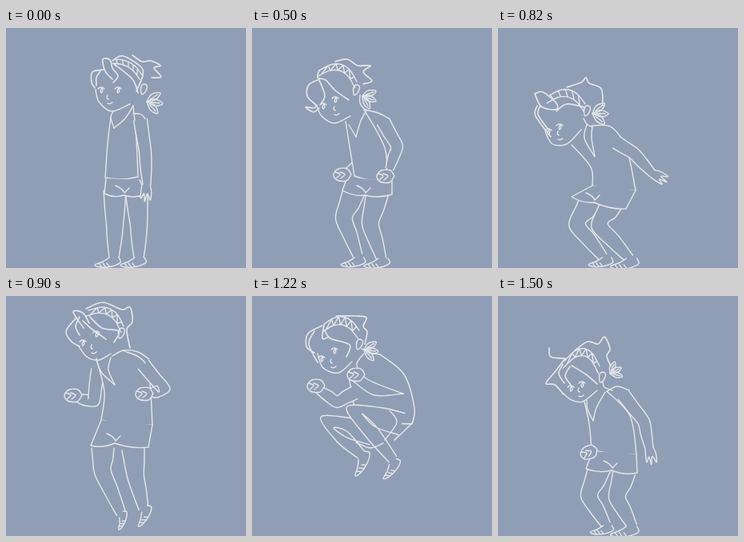
An HTML page that plays this animation: 300x300 px, repeating every 1700 ms.

```html
<!DOCTYPE html>
<html lang="en">
<head>
<meta charset="utf-8">
<title>Jump sketch</title>
<style>
html, body { margin: 0; width: 100%; height: 100%; overflow: hidden; background: #909eb5; }
svg { display: block; width: 100vw; height: 100vh; }
path { fill: none; stroke: #e4e7e9; stroke-width: 1.4; stroke-linecap: round; stroke-linejoin: round; }
.skin { fill: #909eb5; stroke: none; }
.heavy { stroke-width: 1.65; }
</style>
</head>
<body>
<svg id="stage" viewBox="0 0 300 300"></svg>
<script>
let ink = "";
const draw = (d, cls = "") => { ink += `<path class="${cls}" d="${d}"/>`; };
const mix = (a, b, t) => a.map((v, k) => v + (b[k] - v) * t);
const pairs = n => Array.from({ length: n.length / 2 }, (_, i) => [n[2 * i], n[2 * i + 1]]);

// Catmull-Rom spline written as cubic Béziers.
function curve(pts) {
  const at = i => pts[Math.max(0, Math.min(pts.length - 1, i))];
  let d = "M" + pts[0];
  for (let i = 0; i < pts.length - 1; i++) {
    const [a, b, c, e] = [at(i - 1), at(i), at(i + 1), at(i + 2)];
    const c1 = b.map((v, k) => v + (c[k] - a[k]) / 6);
    const c2 = c.map((v, k) => v - (e[k] - b[k]) / 6);
    d += `C${c1} ${c2} ${c}`;
  }
  return d;
}

const line = (...n) => draw(curve(pairs(n)));
const hair = (...n) => draw(curve(pairs(n)), "heavy");
const between = (a, b) => curve(a) + "L" + curve([...b].reverse()).slice(1) + "Z";

// Places a small shape at x, y with a turn and a scale.
function place(x, y, deg, scale, n) {
  const c = Math.cos(deg * Math.PI / 180) * scale, s = Math.sin(deg * Math.PI / 180) * scale;
  return pairs(n).map(([u, v]) => [x + u * c - v * s, y + u * s + v * c]);
}
function solid(pts) {
  draw(curve(pts), "skin");
  draw(curve(pts));
}

// A limb is two contours around a bent centre line.
function limb(start, bend, end, widths) {
  const mid = [start, mix(start, bend, .5), bend, mix(bend, end, .45), end];
  const side = sign => mid.map(([x, y], i) => {
    const [ax, ay] = mid[Math.max(0, i - 1)], [bx, by] = mid[Math.min(4, i + 1)];
    const r = sign * widths[i] / 2 / Math.hypot(bx - ax, by - ay);
    return [x - (by - ay) * r, y + (bx - ax) * r];
  });
  const a = side(1), b = side(-1);
  draw(between(a, b), "skin");
  draw(curve(a) + curve(b));
}
const leg = (...n) => limb(...pairs(n), [28, 25, 21, 18, 12]);
const arm = (...n) => limb(...pairs(n), [17, 16, 15, 14, 10]);

function foot(x, y, deg = 0, scale = 1) {
  solid(place(x, y, deg, scale, [-6, 0, -14, 5, -24, 9, -17, 12, -3, 11, 8, 6, 6, 0]));
  for (const u of [-19, -14, -9]) draw(curve(place(x, y, deg, scale, [u, 7, u + 3, 11])));
}
function fist(x, y, deg = 0) {
  solid(place(x, y, deg, 1, [11, -1, 6, -8, -5, -8, -11, -1, -7, 6, 5, 7, 11, -1]));
  for (const u of [-9, -3]) draw(curve(place(x, y, deg, 1, [u, -4, u + 6, -1, u + 1, 4])));
}
const palm = (x, y, deg) =>
  solid(place(x, y, deg, 1, [0, -5, 8, -7, 19, -6, 11, -2, 21, 1, 11, 2, 17, 6, 8, 6, 0, 5]));

function body(front, back) {
  const a = pairs(front), b = pairs(back);
  draw(between(a, b), "skin");
  const [x, y] = a.at(-1), [u, v] = b.at(-1);
  draw(curve(a) + curve(b) + `M${x} ${y}Q${(x + u) / 2} ${(y + v) / 2 + 5} ${u} ${v}`);
}
function shorts(...n) {
  const [a, b, c, d, e] = pairs(n);
  const sag = (p, q) => `Q${(p[0] + q[0]) / 2} ${(p[1] + q[1]) / 2 + 5} ${q}`;
  const outline = `M${a}L${b}${sag(b, c)}${sag(c, d)}L${e}`;
  draw(outline + "Z", "skin");
  draw(outline + `M${c[0] - 10} ${c[1] - 12}q8 3 11 9l6 -6`);
}

// Headband: two arcs joined by one zigzag or by slanted stripes.
function band(x, y, u, v, rise, depth, zigzag = true) {
  const len = Math.hypot(u - x, v - y), nx = (v - y) / len, ny = (x - u) / len;
  const edge = (shift, t) => {
    const h = 4 * t * (1 - t) * rise - shift;
    return [x + (u - x) * t + nx * h, y + (v - y) * t + ny * h];
  };
  const arc = shift => curve([0, .25, .5, .75, 1].map(t => edge(shift, t)));
  let d = arc(0) + arc(depth);
  for (let i = 1; i < 11; i++) {
    const t = i / 11;
    if (zigzag) d += (i > 1 ? "L" : "M") + edge(i % 2 * depth, t);
    else if (i % 2) d += `M${edge(0, t - .05)}L${edge(depth, t + .05)}`;
  }
  draw(d);
}
function ponytail(x, y, size, deg) {
  for (const turn of [-40, 0, 40]) {
    draw(curve(place(x, y, deg + turn, size, [0, 0, .5, -.22, 1, 0, .55, .2, 0, 0])));
    draw(curve(place(x, y, deg + turn, size, [.25, 0, .8, 0])));
  }
}
const eye = (x, y) => draw(
  `M${x - 4} ${y - 2}Q${x} ${y - 6} ${x + 4} ${y - 2}M${x + 1} ${y - 3}q-3 3 -1 6q3 -1 1 -6`);
const ear = (x, y) => draw(`M${x - 3} ${y + 5}q-2 -10 3 -12q6 0 4 6q-2 6 -6 7`);
const mouth = (x, y) => draw(`M${x - 3} ${y}q3 2 6 -1M${x - 3} ${y - 10}q-2 4 1 5`);

function stand() {
  leg(136, 203, 136, 247, 135, 287);
  foot(135, 287);
  leg(163, 203, 166, 248, 166, 288);
  foot(167, 287);
  body([131, 112, 127, 145, 124, 187], [159, 97, 163, 140, 165, 186]);
  line(134, 104, 131, 112, 135, 125);
  line(135, 125, 149, 113, 159, 97);
  shorts(125, 188, 123, 207, 147, 209, 175, 208, 167, 190);
  line(159, 107, 169, 108, 176, 116);
  arm(168, 115, 174, 155, 176, 196);
  palm(175, 196, 92);
  line(112, 77, 116, 92, 132, 104, 155, 95);
  eye(119, 78);
  eye(140, 78);
  ear(172, 77);
  mouth(130, 94);
  band(136, 39, 170, 59, 6, 6, false);
  hair(122, 52, 108, 55, 107, 68, 111, 75);
  hair(118, 54, 113, 62, 113, 72);
  hair(134, 68, 140, 60, 133, 50, 130, 40, 121, 39, 124, 54, 133, 64);
  hair(135, 45, 158, 64, 165, 81);
  hair(133, 41, 146, 35, 168, 48, 171, 59, 163, 79);
  hair(158, 34, 170, 42, 181, 41, 193, 47, 185, 50, 194, 61, 182, 62);
  ponytail(176, 92, 20, 7);
}

function lean() {
  leg(157, 205, 148, 245, 162, 289);
  foot(164, 288);
  leg(128, 203, 115, 238, 132, 284);
  foot(134, 287, 0, .95);
  line(127, 166, 120, 173, 114, 178);
  body([117, 117, 121, 142, 128, 185], [140, 102, 166, 150, 168, 190]);
  line(121, 121, 130, 136);
  line(130, 136, 136, 116, 143, 103);
  line(135, 84, 135, 94, 141, 102);
  shorts(119, 187, 113, 203, 141, 209, 175, 208, 175, 191);
  fist(113, 184);
  line(141, 102, 157, 106, 171, 113);
  arm(164, 117, 181, 148, 172, 176);
  fist(167, 186);
  line(81, 97, 87, 110, 103, 119, 123, 110);
  eye(89, 98);
  eye(104, 90);
  ear(130, 78);
  mouth(106, 108);
  band(84, 53, 131, 67, 15, 8);
  hair(84, 64, 71, 71, 69, 85, 81, 97);
  hair(81, 97, 77, 100, 67, 99, 77, 105, 84, 100);
  hair(84, 53, 82, 62, 92, 65, 104, 78, 121, 90);
  hair(84, 65, 91, 84, 86, 95);
  hair(104, 42, 119, 39, 132, 47, 148, 47, 139, 55, 150, 66, 139, 70);
  ponytail(138, 85, 18, 20);
}

function windUp() {
  leg(118, 212, 99, 246, 131, 286);
  foot(136, 287, 0, .95);
  leg(145, 214, 127, 247, 164, 288);
  foot(167, 288, 0, 1.1);
  body([92, 146, 116, 174, 118, 197], [117, 122, 142, 124, 161, 152, 172, 203]);
  line(107, 113, 111, 120, 118, 124);
  line(111, 121, 108, 138, 121, 161);
  line(118, 123, 117, 138, 121, 160);
  shorts(118, 197, 92, 211, 120, 218, 160, 226, 172, 203);
  arm(148, 143, 170, 157, 193, 182);
  palm(193, 182, 28);
  line(59, 130, 68, 145, 86, 145, 104, 127);
  eye(63, 130);
  eye(77, 124);
  ear(111, 104);
  mouth(78, 139);
  band(63, 85, 109, 95, 13, 9, false);
  hair(46, 82, 56, 80, 73, 94, 72, 102, 54, 98, 46, 82);
  hair(49, 97, 47, 110, 66, 136);
  hair(53, 97, 50, 108, 62, 126);
  hair(86, 74, 104, 68, 110, 62, 114, 69, 129, 76, 131, 97);
  hair(73, 104, 86, 95, 108, 99);
  ponytail(118, 107, 20, 0);
}

function jump() {
  arm(115, 92, 109, 132, 90, 128);
  fist(84, 125);
  leg(121, 190, 121, 220, 144, 272);
  foot(144, 273, -60, .75);
  leg(159, 192, 162, 225, 172, 266);
  foot(173, 266, -50, .9);
  body([113, 79, 123, 120, 119, 155], [146, 68, 176, 88, 183, 161]);
  line(113, 78, 119, 95, 136, 111);
  line(131, 77, 128, 92, 136, 111);
  shorts(119, 155, 106, 187, 136, 184, 178, 189, 183, 161);
  line(133, 75, 147, 68, 165, 70, 179, 79);
  arm(172, 86, 198, 118, 180, 121);
  fist(173, 123);
  line(91, 63, 101, 76, 116, 80, 131, 72);
  eye(96, 59);
  eye(113, 48);
  ear(144, 47);
  mouth(110, 71);
  band(103, 18, 147, 38, 13, 8);
  hair(97, 40, 84, 20, 96, 21, 104, 34);
  hair(88, 27, 75, 44, 82, 57, 92, 63);
  hair(92, 26, 87, 38, 92, 49);
  hair(96, 31, 107, 41, 125, 54);
  hair(104, 25, 120, 40, 141, 44, 135, 58);
  hair(100, 16, 121, 8, 145, 17, 155, 14, 158, 32, 151, 42, 155, 65);
}

function tuck() {
  leg(150, 172, 94, 158, 136, 198);
  foot(137, 199, -52, 1.05);
  body([120, 95, 124, 118, 130, 150], [160, 73, 190, 98, 203, 140, 200, 160]);
  arm(128, 121, 106, 132, 83, 117);
  fist(80, 113);
  line(137, 66, 148, 71, 160, 73);
  leg(187, 160, 128, 143, 176, 204);
  foot(176, 207, -40, .95);
  line(172, 143, 181, 158, 166, 180);
  line(201, 158, 190, 169, 178, 180);
  line(130, 183, 148, 190, 164, 184);
  line(140, 72, 131, 86, 144, 104, 189, 122);
  line(127, 107, 153, 124, 189, 122);
  fist(130, 99);
  line(82, 72, 89, 90, 108, 96, 125, 82);
  eye(87, 79);
  eye(103, 69);
  ear(134, 61);
  mouth(102, 89);
  band(90, 35, 134, 43, 13, 10);
  hair(88, 37, 70, 47, 68, 63, 78, 71);
  hair(78, 44, 71, 60, 82, 83);
  hair(90, 36, 88, 53, 96, 51);
  hair(91, 43, 98, 53, 122, 61, 118, 76);
  hair(105, 25, 130, 25, 143, 27, 139, 38, 144, 45, 141, 60);
  ponytail(140, 67, 18, 8);
}

function land() {
  line(131, 127, 126, 138, 118, 146);
  leg(125, 185, 115, 220, 152, 268);
  foot(152, 270, -52, .75);
  leg(164, 187, 162, 222, 175, 260);
  foot(176, 262, -40, .85);
  body([120, 88, 131, 115, 131, 142], [137, 73, 172, 84, 184, 150]);
  line(134, 63, 136, 72, 146, 77);
  line(117, 90, 124, 100, 130, 98);
  line(130, 98, 132, 88, 130, 80);
  line(132, 136, 150, 138, 166, 137);
  shorts(126, 152, 108, 178, 143, 182, 181, 184, 184, 151);
  line(126, 153, 150, 152, 183, 160);
  palm(118, 150, 155);
  line(137, 74, 160, 70, 181, 78);
  arm(174, 84, 202, 120, 180, 138);
  palm(179, 138, 185);
  line(90, 66, 98, 80, 114, 84, 129, 68);
  eye(96, 69);
  eye(111, 62);
  ear(130, 54);
  mouth(109, 79);
  band(84, 31, 130, 37, 15, 8);
  hair(83, 33, 68, 34, 60, 29, 62, 38, 73, 41, 83, 33);
  hair(82, 60, 65, 62, 90, 69);
  hair(75, 41, 74, 52, 82, 60);
  hair(88, 36, 81, 50, 90, 66);
  hair(86, 35, 100, 52, 124, 68);
  hair(91, 36, 117, 46, 127, 59);
  hair(97, 20, 106, 10, 121, 15, 131, 26, 139, 46);
  ponytail(140, 54, 18, -22);
}

function recover() {
  leg(158, 220, 149, 252, 168, 288);
  foot(167, 288, 0, 1.1);
  leg(127, 215, 114, 250, 135, 286);
  foot(137, 287, 0, .9);
  body([108, 132, 114, 160, 117, 192], [136, 119, 165, 150, 173, 198]);
  line(131, 107, 133, 114, 143, 118);
  line(111, 130, 112, 142, 119, 156);
  line(119, 156, 123, 140, 134, 120);
  shorts(118, 194, 110, 216, 142, 218, 174, 221, 173, 198);
  fist(114, 196, -20);
  line(136, 119, 149, 113, 164, 118);
  arm(157, 124, 182, 157, 189, 190);
  palm(189, 190, 80);
  line(82, 122, 92, 130, 106, 132, 124, 118);
  eye(91, 116);
  eye(105, 111);
  ear(130, 102);
  mouth(104, 125);
  band(83, 81, 127, 88, 19, 9);
  hair(64, 65, 66, 76, 84, 78);
  hair(84, 78, 72, 94, 60, 109, 71, 111, 82, 123);
  hair(81, 85, 76, 97, 83, 109);
  hair(90, 88, 84, 100, 91, 111);
  hair(92, 87, 110, 98, 124, 110);
  hair(96, 68, 112, 57, 125, 60, 133, 51, 140, 66, 136, 75, 141, 88);
  ponytail(140, 97, 16, -28);
}

const poses = [stand, lean, windUp, jump, tuck, land, recover];
const firstHold = 500, hold = 200;
const loop = firstHold + hold * (poses.length - 1);

const stage = document.getElementById("stage");
stage.innerHTML = poses.map(pose => {
  ink = "";
  pose();
  return `<g visibility="hidden">${ink}</g>`;
}).join("");
const figures = [...stage.children];

function render(ms) {
  const current = Math.max(0, Math.floor((ms % loop - firstHold) / hold) + 1);
  figures.forEach((g, i) => g.setAttribute("visibility", i === current ? "visible" : "hidden"));
}

let start;
function tick(now) {
  start ??= now;
  render(now - start);
  requestAnimationFrame(tick);
}
render(0);
requestAnimationFrame(tick);
</script>
</body>
</html>
```
